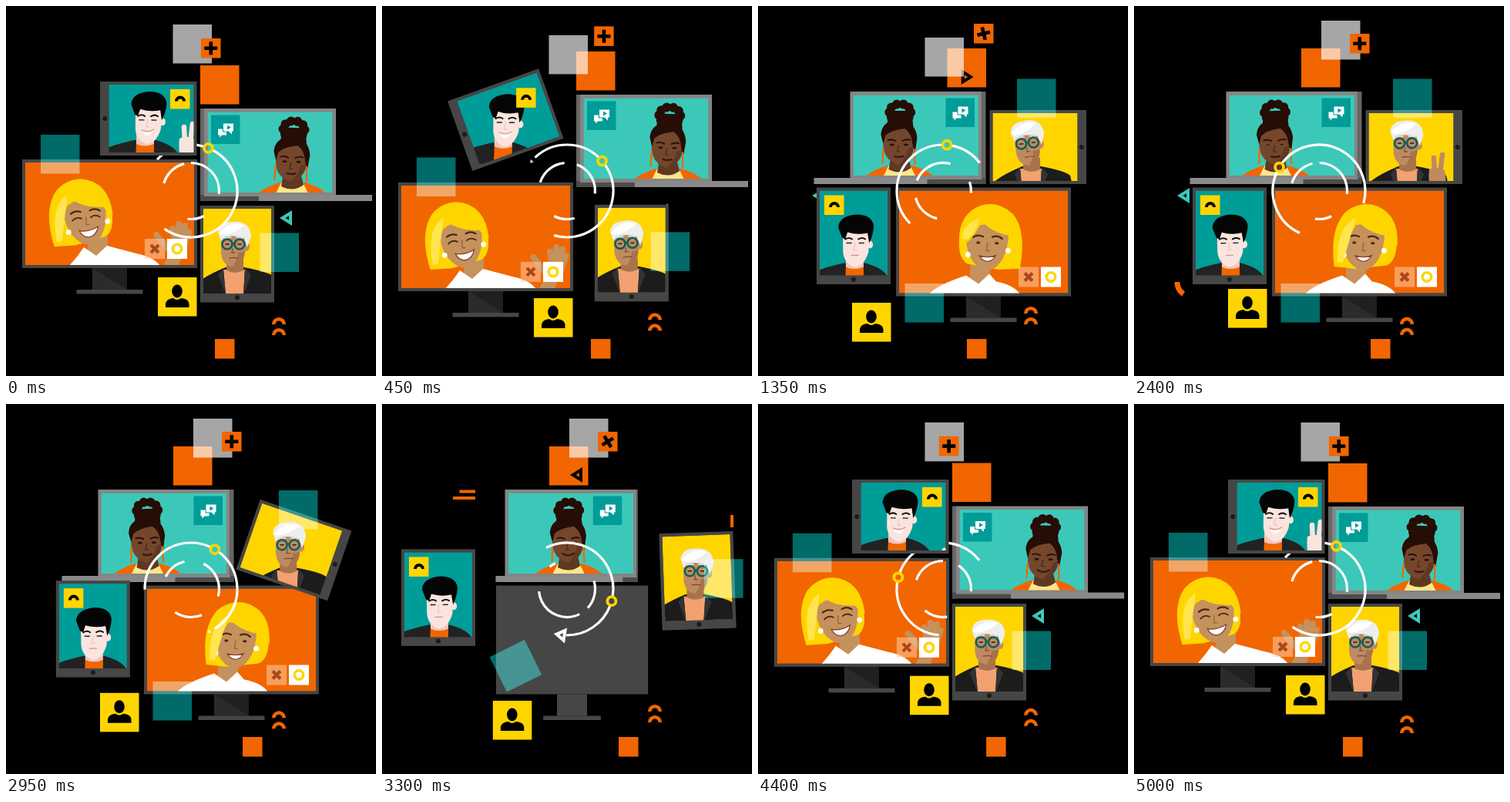
These frames come from a looping animation (480x480 px, 5.05 s). An HTML page with a canvas:

```html
<!DOCTYPE html>
<html lang="en">
<head>
<meta charset="utf-8">
<title>Video call devices</title>
<style>
  html, body { margin: 0; height: 100%; overflow: hidden; background: #000; }
  canvas { display: block; width: 100vw; height: 100vh; }
</style>
</head>
<body>
<canvas id="stage" width="480" height="480"></canvas>
<script>
const g = document.getElementById('stage').getContext('2d');
const LOOP = 5050, RAD = Math.PI / 180;
const ORANGE = '#f16600', YELLOW = '#ffd500', TEAL = '#009c98', MINT = '#3cc8b8',
      GLOW = '#006b68', FRAME = '#464646', WHITE = '#fff', INK = '#000';

// ---- timing ----
const clamp = v => Math.max(0, Math.min(1, v));
const mix = (a, b, u) => a + (b - a) * u;
const ramp = (t, a, b) => clamp((t - a) / (b - a));
const smooth = u => u * u * (3 - 2 * u);
const ease = (t, a, b) => smooth(ramp(t, a, b));
const cubic = u => u < .5 ? 4 * u ** 3 : 1 - 4 * (1 - u) ** 3;
const bump = (t, mid, half) => clamp(2 - 2 * Math.abs(t - mid) / half);
const pulse = (t, on, off, span = 550) => ease(t, on, on + span) - ease(t, off, off + span);

// Smooth monotone path through poses [time, value, value, ...].
function through(t, poses) {
  const last = poses.length - 1;
  t = Math.max(poses[0][0], Math.min(poses[last][0], t));
  let i = 0;
  while (i < last - 1 && t > poses[i + 1][0]) i++;
  const slope = (k, c) => (poses[k + 1][c] - poses[k][c]) / (poses[k + 1][0] - poses[k][0]);
  const tangent = (k, c) => {
    if (k === 0 || k === last) return 0;
    const a = slope(k - 1, c), b = slope(k, c);
    return a * b <= 0 ? 0 : 2 * a * b / (a + b);
  };
  const from = poses[i], to = poses[i + 1], span = to[0] - from[0], u = (t - from[0]) / span;
  return from.map((v, c) => mix(v, to[c], smooth(u))
    + span * (u * (1 - u) ** 2 * tangent(i, c) - u * u * (1 - u) * tangent(i + 1, c))).slice(1);
}

// Home, swing out, stay away, swing back, home again.
const route = (t, home, out, away, back) => through(t, [
  [300, ...home], [800, ...out], [1300, ...away], [2800, ...away], [3300, ...back], [3900, ...home]]);

// Shared state of the whole scene at a time.
function sceneAt(t) {
  const out = ramp(t, 490, 1235), back = ramp(t, 2990, 3735), cycle = 2 * Math.PI * t / 5000;
  return {
    t, out, cycle,
    turn: out - back,
    away: cubic(out) - cubic(back),
    spin: 360 * (out + back),
    lift: 1 - pulse(t, 50, 3900),
    wave: Math.sin(cycle) ** 2
  };
}

// ---- drawing helpers ----
function rect(x, y, w, h, color) { g.fillStyle = color; g.fillRect(x, y, w, h); }
function fill(color, path) { g.fillStyle = color; g.fill(new Path2D(path)); }
function line(color, width, path, cap = 'round') {
  g.strokeStyle = color; g.lineWidth = width; g.lineCap = cap; g.stroke(new Path2D(path));
}
function oval(x, y, rx, ry, color) {
  g.fillStyle = color; g.beginPath(); g.ellipse(x, y, rx, ry, 0, 0, 7); g.fill();
}
function arc(x, y, r, from, to, width, color) {
  if (to <= from) return;
  g.strokeStyle = color; g.lineWidth = width; g.lineCap = 'butt';
  g.beginPath(); g.arc(x, y, r, from * RAD, to * RAD); g.stroke();
}
function at(x, y, angle, draw) {
  g.save(); g.translate(x, y); g.rotate(angle * RAD); draw(); g.restore();
}
function screen(x, y, w, h, color) {
  g.beginPath(); g.rect(x, y, w, h); g.clip(); rect(x, y, w, h, color);
}
function triangle(x, y, angle, color, scale = 1) {
  at(x, y, angle, () => { g.scale(scale, scale); line(color, 4, 'M-4.2 0 6-6.4 6 6.4Z'); });
}
function glow(x, y, angle, color) {
  at(x, y, angle, () => { g.globalCompositeOperation = 'screen'; rect(-25, -25, 50.5, 50.5, color); });
}
function victory(x, y, skin) {
  at(x, y, 0, () => {
    line(skin, 6.5, 'M-4 0-5-21M3 0 6-25');
    fill(skin, 'M-11-6Q0-11 9-5Q13 8 6 40H-7Q-13 8-11-6Z');
  });
}

// ---- people: origin is the middle of the lower body edge ----
function youngMan({ t, cycle }) {
  const skin = '#fbe4de', shade = '#f1c6bc', sway = Math.cos(cycle), smiling = t < 1050 || t > 4350;
  fill('#222', 'M-48 12V-6Q-40-10-14-16H14Q36-10 42 0V12Z');
  fill(ORANGE, 'M-12 12-11-13H12V12Z');
  fill(shade, 'M-11-28H12V-11Q0-6-11-11Z');
  at(2.5 + 2.5 * sway, -42, sway, () => {
    oval(18, 2, 4, 5, skin);
    fill(skin, 'M-17-16V9Q-17 25-3 31Q10 31 16 12L18-16Z');
    fill('#050505', 'M-18-7-23-20Q-22-35 0-37Q21-37 23-22Q22-9 17 0L15-13Q2-10-11-14L-14-5Z');
    line('#111', 2, 'M-14-5Q-9-8-5-5M3-5Q8-8 12-5');
    line('#222', 1.4, 'M-12 0H-6M4 0H10');
    line(shade, 1.3, 'M-1 0-3 9H1');
    if (smiling) fill(WHITE, 'M-9 13Q-1 16 7 12Q4 20-2 20Q-7 19-9 13Z');
    line('#d98f88', 1.3, smiling ? 'M-9 13Q-1 17 7 12' : 'M-6 16H3');
  });
  const hidden = pulse(t, 50, 4250);
  if (hidden < 1) victory(56, -12 + 45 * hidden, skin);
}

function elderMan({ t, cycle }) {
  const skin = '#c08a60', shade = '#a8734c', sway = Math.sin(cycle);
  fill('#1c1c1c', 'M-54 20V-8Q-46-20-12-34H12Q44-28 50-22L60 20Z');
  fill('#f3a170', 'M-12 20V0L-15-31H13L11 0V20Z');
  fill('#333', 'M-15-33-22-24-12 2ZM13-33 21-24 11 2Z');
  fill(shade, 'M-11-45H11V-30Q0-24-11-30Z');
  at(-2 - 3.5 * sway, -64, -7 * Math.max(0, sway), () => {
    oval(17, 3, 4, 6, skin);
    fill(skin, 'M-16-12V12Q-14 28-1 29Q14 27 15 10V-12Z');
    fill(shade, 'M6 10Q12 12 15 8Q14 27-1 29Q6 20 6 10Z');
    fill('#eee', 'M-16-4-20-16Q-18-28-4-29Q22-32 23-10L18 4 14-8Q0-13-12-9Z');
    fill(WHITE, 'M-19-14Q-6-31 14-25Q4-14-14-12Z');
    line('#ddd', 2.2, 'M-13-8-4-9M4-9 12-8');
    for (const side of [-8, 8]) {
      arc(side, 0, 6.5, 0, 360, 2.6, '#0b5f5c');
      line('#2a1a12', 1.5, `M${side - 2} 0H${side + 2}`);
    }
    line('#0b5f5c', 2, 'M-1.5-1H1.5');
    line('#7d5237', 1.4, 'M-1 6-2 11H2M-5 18Q0 17 6 18');
  });
  const raised = pulse(t, 1700, 2500, 400);
  if (raised) victory(39, -24 + 50 * (1 - raised), skin);
}

function bunWoman({ t, cycle }) {
  const skin = '#74462c', shade = '#5f3822', hair = '#260d06';
  fill(ORANGE, 'M-46 3Q-38-6-16-13H17Q40-6 46 3Z');
  fill('#fbe68a', 'M-22 3-14-13H14L22 3Z');
  fill(shade, 'M-11-26H11L15-10Q2 0-14-8Z');
  at(-1, -39, 2 * Math.cos(cycle), () => {
    for (let i = 0; i < 10; i++) oval(2 + 14 * Math.cos(i * .63), -43 + 11 * Math.sin(i * .63), 6, 6, hair);
    fill(hair, 'M-13-45H17L19-25H-15Z');
    fill(skin, 'M-20-22V2Q-18 20 0 25Q18 20 20 2V-22Z');
    fill(shade, 'M12 4 20 0Q18 20 0 25Q10 16 12 4Z');
    fill(hair, 'M-20-2-23-14Q-22-32 0-34Q22-32 24-10L21 10 18-2Q17-16 8-22Q-10-20-17-13Z');
    line(ORANGE, 2.2, 'M-20 5-21 23M20 5 21 24');
    line(hair, 1.8, 'M-14-7Q-9-9-4-6M5-6Q10-9 15-7');
    line(hair, t > 2150 && t < 2650 ? 1.2 : 2.6, 'M-10-1H-7M8-1H11');
    line('#452414', 1.2, 'M0 0-2 8H2');
    line('#3f1714', 2.4, t > 3100 && t < 4500 ? 'M-7 13Q0 18 8 13' : 'M-5 14Q0 16 6 14');
  });
}

function blondWoman({ t, away }) {
  const skin = '#c5915c', brown = '#4a2914', home = away < .5, turned = !home && t < 1850;
  if (home) {
    at(196, 137, 3 * Math.sin(t * Math.PI * 2 / 1250), () => {
      line(skin, 8, 'M4-24-1-47M8-24 7-53M11-22 15-51M13-20 20-43M-4-18-22-39');
      fill(skin, 'M-6-30H16Q17-14 9-6L5 6H-16L-6-12Z');
    });
  }
  const shift = home ? 120 : 102, neck = home ? 98 : 109;
  fill(skin, `M${neck - 13} 98H${neck + 13}V122L${neck} 136 ${neck - 13} 122Z`);
  fill(WHITE, `M${shift - 59} 138Q${shift - 48} 126 ${neck - 18} 114L${neck - 2} 125 ${neck + 12} 112`
    + `L${shift + 28} 122Q${shift + 50} 126 ${shift + 59} 138Z`);
  at(mix(76, 122, away), mix(70, 66, away), mix(-8, 2, away), () => {
    const streak = turned ? 2 : 32;
    g.save();
    if (turned) g.scale(-1, 1);
    fill(YELLOW, 'M-40 38Q-48-10-28-33Q-8-50 14-42Q42-30 40 6Q40 28 28 34L-12 40Z');
    g.restore();
    at(home ? 5 : -4, 0, 0, () => {
      fill(skin, 'M-27-8Q-28 20-14 34Q0 48 14 36Q28 22 28-8Q0-28-27-8Z');
      line(brown, 2.2, 'M-18-1Q-12-5-5-2M7-2Q14-5 20 0');
      if (home) line(brown, 1.8, 'M-17 8Q-11 3-5 7M7 7Q13 3 19 8');
      else line(brown, 3, 'M-12 6H-10M12 6H14');
      line('#99663b', 1.4, 'M1 6 0 16H4');
      const smile = home ? 'M-10 22Q2 26 15 20Q11 32 1 32Q-7 31-10 22Z' : 'M-9 23Q2 26 12 22Q8 30 1 30Q-6 29-9 23Z';
      fill(WHITE, smile);
      line('#8a4630', 1.4, smile);
      oval(-24, 22, 3.4, 3.4, WHITE);
      oval(28, 15, 3.4, 3.4, WHITE);
    });
    fill(YELLOW, 'M-36 4Q-40-44 4-44Q42-38 41 8Q36 6 30-4Q4-6-12-22Q-17-6-29 6Z');
    fill('#ffe64f', `M-36 ${streak}Q-38-16-14-26Q-19-6-29 ${streak}Z`);
  });
}

// ---- devices ----
function monitor(s) {
  const width = Math.cos(s.spin * RAD), front = width > 0;
  at(mix(134.5, 292.5, s.away), 235.5 - 36.5 * s.lift, 0, () => {
    g.scale(Math.max(.02, Math.abs(width)), 1);
    rect(-22.5, 141, 45, 28, front ? '#2b2b2b' : FRAME);
    if (front) fill('#202020', 'M-22.5 141H22.5V169Z');
    rect(-43, 169, 86, 5.5, FRAME);
    rect(-113.5, 0, 227, 141, FRAME);
    if (!front) return;
    g.translate(-113.5, 0);
    screen(4, 4, 219, 133, ORANGE);
    blondWoman(s);
    rect(159, 103, 26, 26, 'rgba(255,205,170,.55)');
    line('#a9481a', 4, 'M167 111 177 121M177 111 167 121', 'butt');
    rect(188, 103, 26, 26, WHITE);
    arc(201, 116, 5.7, 0, 360, 3.6, YELLOW);
  });
}

function laptop(s) {
  const turn = Math.cos(Math.PI * s.turn), side = Math.abs(turn) * 5;
  const left = turn * (turn > 0 ? 71 : 47), right = 171 + turn * (turn > 0 ? 47 : 71);
  at(mix(257, 119.5, s.away), 111 + 22 * s.lift, 0, () => {
    rect(turn > 0 ? -side : 171, 0, side, 120, '#666');
    rect(turn > 0 ? -side : 0, 112, 171 + side, 8, '#4c4c4c');
    rect(0, 0, 171, 114, '#858585');
    rect(left, 112, right - left, 8, '#898989');
    screen(4.5, 4.5, 162, 104.5, MINT);
    at(89 + 25 * turn, 109, 0, () => bunWoman(s));
    at(mix(124, 9, (1 - s.away) ** 2), 8.5, 0, () => {
      rect(0, 0, 37.5, 37.5, TEAL);
      fill(WHITE, 'M9 18H20V26H14L11 29V26H9Z');
      line(TEAL, 2, 'M16 11H29V21H27V25L23 21H16Z');
      fill(WHITE, 'M16 11H29V21H27V25L23 21H16Z');
      fill(TEAL, 'M21 13 26 16 21 19Z');
    });
  });
}

function tablet([x, y, angle], color, content) {
  at(x, y, angle, () => {
    rect(-48, -62.5, 96, 125.5, FRAME);
    oval(0, 56.7, 3, 3, '#1b1b1b');
    screen(-44, -58.5, 88, 110, color);
    g.rotate(-angle * RAD);
    content(Math.abs(angle) / 90);
  });
}

function youngTablet(s) {
  const pose = route(s.t, [185, 146, 90], [73, 160.5, 0], [124, 298, 0], [73, 251, 0]);
  tablet(pose, TEAL, wide => {
    at(1 - 6 * wide, 51.5 - 7.5 * wide, 0, () => youngMan(s));
    at(mix(-38, 28, wide), mix(-52.5, -38, wide), 0, () => {
      rect(0, 0, 25.5, 25.5, YELLOW);
      arc(13, 15.5, 5, 180, 360, 4, INK);
    });
  });
}

function elderTablet(s) {
  const pose = route(s.t, [300, 321.5, 0], [409, 310, 0], [363, 183, -90], [409.5, 229, -2]);
  tablet(pose, YELLOW, wide =>
    at(-3 - 5 * wide, 51.5 + 7.5 * wide, 0, () => elderMan(s)));
}

// ---- rings and loose shapes ----
function rings({ t, wave }) {
  const [middle, knob] = through(t, [[0, -6, -68], [800, -28, -22], [1350, -131, -85],
    [2400, -115, -149], [3300, -13, 15], [3950, 71, 95], [5000, 354, 292]]);
  const half = 131 - 38 * wave, from = middle - half, to = middle + half;
  arc(240, 240, 60, from, knob - 6, 3.2, WHITE);
  arc(240, 240, 60, knob + 6, to, 3.2, WHITE);

  const back = bump(t, 800, 400), ahead = bump(t, 3300, 400);
  const inner = (mid, reach) => arc(240, 240, 36.5, mid - reach, mid + reach, 3.2, WHITE);
  inner(226 + 18 * wave, 30 + 12 * wave - 32 * ahead);
  inner(318 + 35 * wave + 30 * ahead, 48 - 37 * wave + 8 * ahead);
  inner(80 + 55 * wave, 17 + 15 * wave + 28 * ahead);

  const polar = a => [240 + 60 * Math.cos(a * RAD), 240 + 60 * Math.sin(a * RAD)];
  if (back) triangle(...polar(from - 7), from + 83, WHITE, back);
  if (ahead) triangle(...polar(to + 8), to + 278, WHITE, ahead);
  arc(...polar(knob), 5.5, 0, 360, 3.8, YELLOW);
}

function topShapes({ t, lift }) {
  const x = 252 - 35 * pulse(t, 1200, 3350), y = 55 + 22 * lift;
  const forward = 238 + 30 * ease(t, 450, 950) + 42 * ease(t, 1250, 1800);
  const backward = 285 - 33 * ease(t, 2800, 3300) + 11 * ease(t, 3350, 3850) - 31 * ease(t, 3950, 4450);
  rect(x, y, 50.5, 50.5, ORANGE);
  g.save();
  g.beginPath(); g.rect(x, y, 50.5, 50.5); g.clip();
  triangle(t < 2400 ? forward : backward, 92, t < 2400 ? 180 : 0, INK);
  g.restore();
  glow(241.5 + 26.5 * pulse(t, 1680, 3350), 44 + 22 * pulse(t, 50, 1680) + 5 * lift, 0, '#a6a6a6');
  at(253 + 27 * pulse(t, 50, 3350) - 26 * pulse(t, 3350, 4200), 36 + 6 * lift - 13 * pulse(t, 50, 1500), 0, () => {
    rect(0, 0, 25.5, 25.5, ORANGE);
    at(12.8, 12.8, 90 * (ramp(t, 500, 1500) - ramp(t, 2950, 3950)), () =>
      line(INK, 4.6, 'M-8.5 0H8.5M0-8.5V8.5', 'butt'));
  });
}

function lowerShapes({ t, out, away, lift, wave }) {
  at(197 - 75 * away, 385 - 33 * lift - 18 * pulse(t, 1400, 2700), 0, () => {
    rect(0, 0, 50.5, 50.5, YELLOW);
    oval(25, 18, 6.8, 8.5, INK);
    fill(INK, 'M10 39V34Q11 28 20 27Q25 31 30 27Q40 28 40.5 34V39Z');
  });
  rect(271 + 36 * pulse(t, 1700, 4200) - 10 * Math.sin(Math.PI * out), 432, 25.5, 25.5, ORANGE);
  const drop = 14 * (1 - clamp(1.4 * wave));
  for (const top of [399, 413]) arc(354, top + drop, 6.8, 180, 360, 4.6, ORANGE);
}

function marks({ t }) {
  const early = bump(t, 800, 300), late = bump(t, 3300, 300), mid = bump(t, 2400, 350);
  if (early) {
    rect(57, 69, 4, 4, ORANGE);
    rect(65, 69, 4, 4, ORANGE);
  }
  rect(446, 111, 10 * early, 4, ORANGE);
  rect(446, 119.5, 8 * early, 4, ORANGE);
  rect(121 - 20.5 * late, 111.5, 20.5 * late, 4, ORANGE);
  rect(121 - 29 * late, 120, 29 * late, 4, ORANGE);
  rect(452, 144, 4, 16 * late, ORANGE);
  arc(75, 358, 19, 180 - 55 * mid, 180, 7, ORANGE);
}

function draw(t) {
  const s = sceneAt(t);
  rect(0, 0, 480, 480, INK);
  marks(s);
  triangle(363 - 299 * pulse(t, 700, 2850, 750), 275 - 29 * pulse(t, 250, 3350), 0, MINT);
  monitor(s);
  laptop(s);
  elderTablet(s);
  rings(s);
  youngTablet(s);
  topShapes(s);
  lowerShapes(s);
  glow(mix(70, 216, s.away), mix(228, 385, s.away) - 36 * s.lift, 90 * s.away, GLOW);
  glow(...route(t, [354.5, 319.5], [442, 308], [361, 119.5], [443, 226]), 0, GLOW);
}

const start = performance.now();
function tick() {
  draw((performance.now() - start) % LOOP);
  requestAnimationFrame(tick);
}
tick();
</script>
</body>
</html>
```
